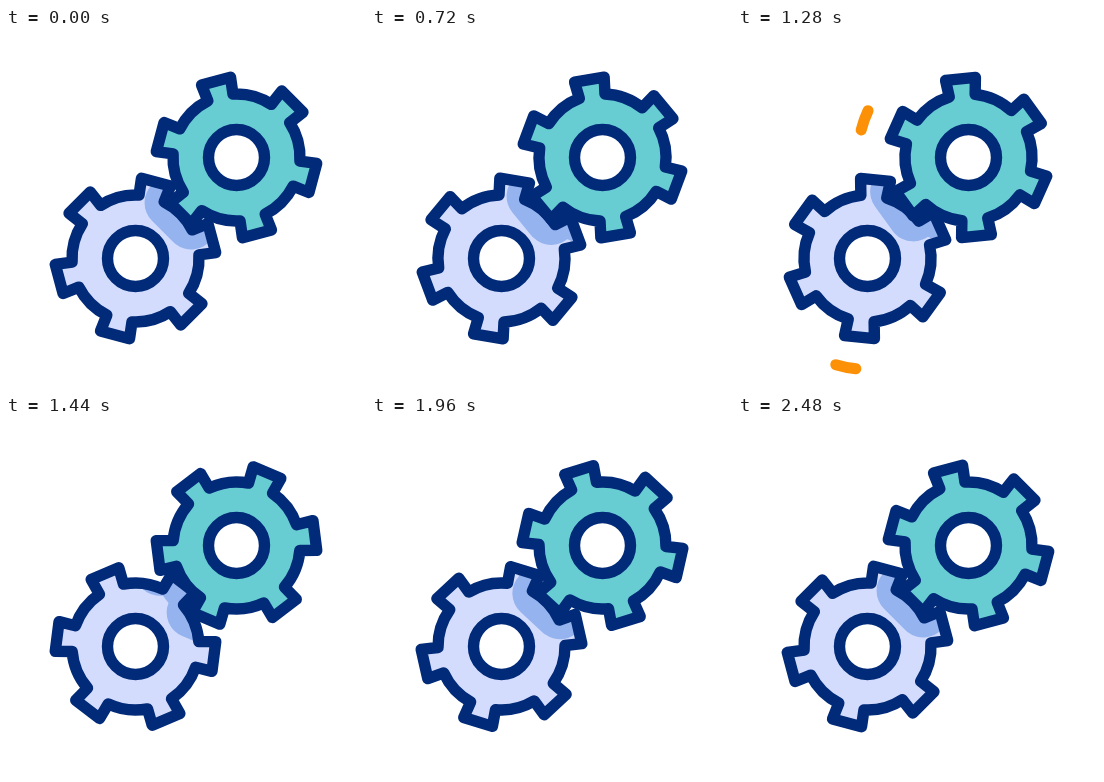
An HTML page that plays this animation: 360x360 px, repeating every 2520 ms.

```html
<!DOCTYPE html>
<html lang="en">
<head>
<meta charset="utf-8">
<title>Turning gears</title>
<style>
  html, body { margin: 0; width: 100%; height: 100%; overflow: hidden; background: #fff; }
  svg { display: block; width: 100vw; height: 100vh; }
  .line { fill: none; stroke: #012a78; stroke-width: 11.4; stroke-linejoin: round; }
  .hub { fill: #fff; stroke: #012a78; stroke-width: 11.4; }
  .swoosh { fill: none; stroke: #fc9006; stroke-width: 11; stroke-linecap: round; }
  .shade { fill: #95b3ef; stroke: #95b3ef; stroke-width: 51; stroke-linejoin: round; }
</style>
</head>
<body>
<svg viewBox="0 0 360 360">
  <defs>
    <path id="gear"/>
    <clipPath id="lowerShape"><path id="clipGear"/></clipPath>
  </defs>
  <path id="upperArc" class="swoosh"/>
  <path id="lowerArc" class="swoosh"/>
  <use href="#gear" class="lower" fill="#d3dcfc"/>
  <g clip-path="url(#lowerShape)"><use href="#gear" class="upper shade"/></g>
  <use href="#gear" class="lower line"/>
  <circle class="hub" cx="129.5" cy="230.5" r="28"/>
  <use href="#gear" class="upper" fill="#67cdd2"/>
  <use href="#gear" class="upper line"/>
  <circle class="hub" cx="230.5" cy="129.5" r="28"/>
</svg>
<script>
  const LOOP = 2520, STEP = 40;
  const LOWER = [129.5, 230.5], UPPER = [230.5, 129.5];
  const ARC_RADIUS = 110.8, ARC_FROM = 8, ARC_TO = 107.5;
  const byId = id => document.getElementById(id);
  const all = selector => [...document.querySelectorAll(selector)];

  // Six teeth on a round body; the first tooth points along +x.
  function gearPath() {
    const body = 63.5, tip = 79, tipHalf = 15, baseHalf = 13;
    const base = Math.sqrt(body * body - baseHalf * baseHalf);
    const tooth = [[base, -baseHalf], [tip, -tipHalf], [tip, tipHalf], [base, baseHalf]];
    let d = '';
    for (let k = 0; k < 6; k++) {
      const c = Math.cos(k * Math.PI / 3), s = Math.sin(k * Math.PI / 3);
      tooth.forEach(([x, y], i) => {
        const link = i ? 'L' : k ? `A${body} ${body} 0 0 1 ` : 'M';
        d += `${link}${(x * c - y * s).toFixed(3)} ${(x * s + y * c).toFixed(3)}`;
      });
    }
    return `${d}A${body} ${body} 0 0 1 ${base} ${-baseHalf}Z`;
  }

  // Eased move from a to b between times t0 and t1.
  function ease(t, t0, t1, a, b) {
    const x = Math.min(1, Math.max(0, (t - t0) / (t1 - t0)));
    return a + (b - a) * x * x * (3 - 2 * x);
  }

  function turn(t) {
    if (t < 835) return ease(t, 240, 835, 0, -6);
    if (t < 1800) return ease(t, 835, 1800, -6, 122.6);
    return ease(t, 1800, 2500, 122.6, 120);
  }

  function arcPath([cx, cy], from, to) {
    const point = deg => {
      const a = deg * Math.PI / 180;
      return `${cx + ARC_RADIUS * Math.cos(a)} ${cy + ARC_RADIUS * Math.sin(a)}`;
    };
    return `M${point(from)}A${ARC_RADIUS} ${ARC_RADIUS} 0 0 ${to > from ? 1 : 0} ${point(to)}`;
  }

  const place = ([x, y], deg) => `translate(${x} ${y}) rotate(${deg})`;
  const outline = gearPath();
  byId('gear').setAttribute('d', outline);
  byId('clipGear').setAttribute('d', outline);
  const lowerParts = [...all('.lower'), byId('clipGear')];
  const upperParts = all('.upper');
  const arcs = all('.swoosh');

  function draw(t) {
    const angle = turn(t);
    lowerParts.forEach(el => el.setAttribute('transform', place(LOWER, angle - 75)));
    upperParts.forEach(el => el.setAttribute('transform', place(UPPER, -angle - 105)));

    const head = ease(t, 760, 1310, ARC_FROM, ARC_TO);
    const tail = ease(t, 945, 1370, ARC_FROM, ARC_TO);
    const visible = t > 760 && t < 1370;
    arcs.forEach(el => el.setAttribute('visibility', visible ? 'visible' : 'hidden'));
    byId('lowerArc').setAttribute('d', arcPath(LOWER, tail, head));
    byId('upperArc').setAttribute('d', arcPath(UPPER, -59 - tail, -59 - head));
  }

  const start = performance.now();
  function tick() {
    const t = (performance.now() - start) % LOOP;
    draw(Math.floor(t / STEP) * STEP);
    requestAnimationFrame(tick);
  }
  draw(0);
  requestAnimationFrame(tick);
</script>
</body>
</html>
```
